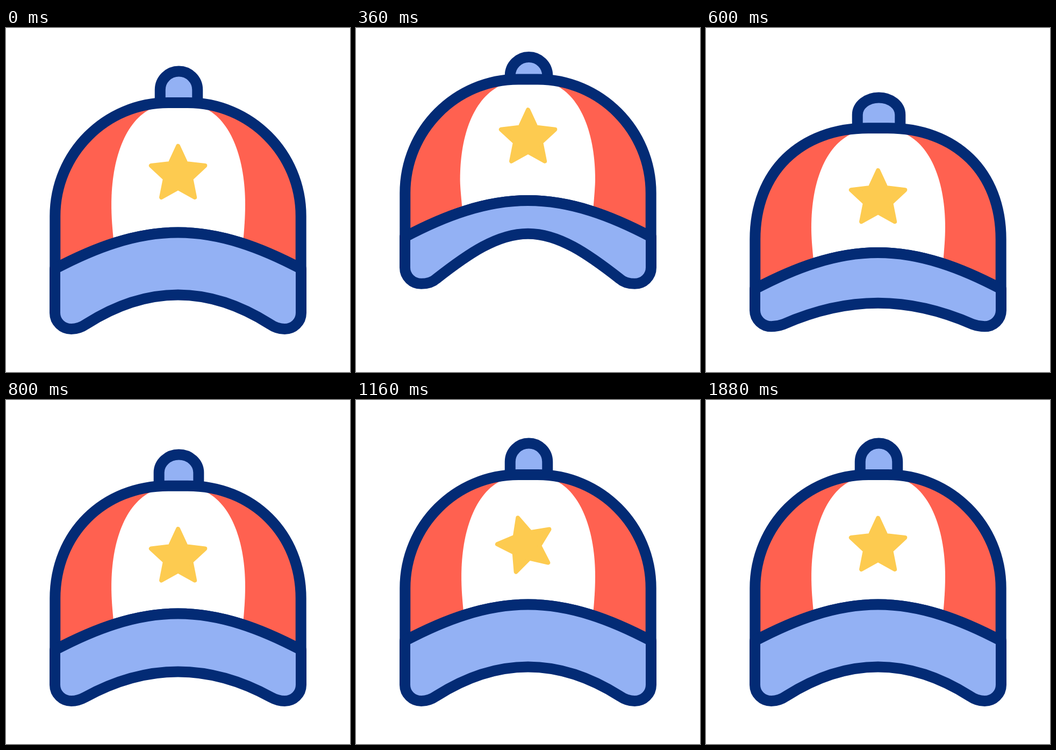
Recreate the animation shown at these times as an HTML page with a canvas. Size 640 px wide and 640 px high, loop 2000 ms.

```html
<!DOCTYPE html>
<html lang="en">
<head>
<meta charset="utf-8">
<title>Bouncing cap</title>
<style>
html, body { margin: 0; width: 100%; height: 100%; overflow: hidden; background: #fff; }
canvas { display: block; width: 640px; height: 640px; }
</style>
</head>
<body>
<canvas id="stage" width="640" height="640"></canvas>
<script>
const ctx = document.getElementById('stage').getContext('2d');
const LOOP = 2000, STEP = 40;
const NAVY = '#032b75', RED = '#ff6150', BLUE = '#93b1f4', GOLD = '#fdcb50';
const LIFT = 1.65, SQUASH = 2.54, SPIN = 107.8;

const ease = p => p * p * (3 - 2 * p);

// Eased 0 -> 1 -> 0
function swing(t, start, peak, end) {
  if (t <= start || t >= end) return 0;
  return ease(t < peak ? (t - start) / (peak - start) : (end - t) / (end - peak));
}

function paint(path, fill) {
  ctx.fillStyle = fill;
  ctx.fill(path);
  ctx.strokeStyle = NAVY;
  ctx.lineWidth = 20;
  ctx.lineJoin = 'round';
  ctx.stroke(path);
}

function draw(t) {
  const lift = LIFT * swing(t, 80, 360, 640);
  const squash = SQUASH * swing(t, 360, 640, 920);
  const angle = SPIN * swing(t, 907, 1400, 1880) * Math.PI / 180;
  const at = (base, up, down) => base - up * lift + down * squash;

  ctx.fillStyle = '#fff';
  ctx.fillRect(0, 0, 640, 640);

  const top = at(139, 26.4, 20.7);
  drawButton(at, top);
  drawCrown(at, top);
  drawBrim(at);
  drawStar(320.1, at(267.1, 40.8, 20.4), angle);
}

function drawButton(at, base) {
  const cx = 321.5, rx = at(34.75, 0, 2.1);
  const y0 = at(80.5, 16, 21), y1 = at(115, 16, 20);
  const p = new Path2D();
  p.moveTo(cx - rx, base);
  p.lineTo(cx - rx, Math.min(y1, base));
  p.ellipse(cx, y1, rx, y1 - y0, 0, Math.PI, 2 * Math.PI);
  p.lineTo(cx + rx, base);
  paint(p, BLUE);
}

// Arc shared by the crown's lower edge and the brim's upper edge
function rim(p, at, left, right) {
  const y = at(380.5, 36, 17);
  p.bezierCurveTo(right - 74, y + 28.5, 400, y, 320, y);
  p.bezierCurveTo(240, y, left + 74, y + 28.5, left, y + 67.5);
}

function drawCrown(at, top) {
  const l = 91.3, r = 640 - l;
  const side = at(350, 26, 19), join = at(448, 36, 17);
  // The shoulders bulge as the cap is squashed
  const hx = at(185.5, 0, -4.5), hy = at(233.5, 26, 15.5);
  const p = new Path2D();
  p.moveTo(l, join);
  p.lineTo(l, side);
  p.bezierCurveTo(l, hy, hx, top, 302, top);
  p.lineTo(338, top);
  p.bezierCurveTo(640 - hx, top, r, hy, r, side);
  p.lineTo(r, join);
  rim(p, at, l, r);

  const s = top + 10, mid = at(328, 28, 19), low = at(400, 36, 17);
  const x = at(196.1, 1.5, 0);
  const panel = new Path2D();
  panel.moveTo(x + 4.5, low);
  panel.bezierCurveTo(x + 1.5, low - 30, x, low - 48, x, mid);
  panel.bezierCurveTo(x, mid - 83, x + 25.5, s + 23, 272, s);
  panel.lineTo(320, s - 8);
  panel.lineTo(369.5, s);
  panel.bezierCurveTo(419.5, s + 23, 445, mid - 83, 445, mid);
  panel.bezierCurveTo(445, low - 48, 443.5, low - 30, 441, low);

  ctx.save();
  ctx.clip(p);
  ctx.fillStyle = RED;
  ctx.fillRect(0, 0, 640, 640);
  ctx.fillStyle = '#fff';
  ctx.fill(panel);
  ctx.restore();
  paint(p, 'transparent');
}

function drawBrim(at) {
  const l = 91, r = 549, m = x => 640 - x;
  const join = at(448, 36, 17), side = at(530, 51, 0), base = at(560, 51, 0);
  const hx = at(141, 0, -2), hy = at(556.5, 50, 0.9);
  const ax = at(149, 0, -2), ay = at(551, 51, 2);
  const bx = at(206, -2, -1.5), by = at(514.7, 57.7, 6.7);
  const mid = at(496.5, 69, 9);
  const p = new Path2D();
  p.moveTo(l, join);
  p.lineTo(l, side);
  p.bezierCurveTo(l, side + 17, 105, base, 121.5, base);
  p.bezierCurveTo(131, base, hx, hy, ax, ay);
  p.bezierCurveTo(bx, by, 263, mid, 320, mid);
  p.bezierCurveTo(377, mid, m(bx), by, m(ax), ay);
  p.bezierCurveTo(m(hx), hy, 509, base, 518.5, base);
  p.bezierCurveTo(535, base, r, side + 17, r, side);
  p.lineTo(r, join);
  rim(p, at, l, r);
  p.closePath();
  paint(p, BLUE);
}

function drawStar(x, y, angle) {
  ctx.save();
  ctx.translate(x, y);
  ctx.rotate(angle);
  ctx.beginPath();
  for (let i = 0; i < 10; i++) {
    const a = i * Math.PI / 5, r = i % 2 ? 25.4 : 52.8;
    ctx.lineTo(r * Math.sin(a), 5.3 - r * Math.cos(a));
  }
  ctx.closePath();
  ctx.fillStyle = ctx.strokeStyle = GOLD;
  ctx.lineWidth = 8;
  ctx.lineJoin = 'round';
  ctx.fill();
  ctx.stroke();
  ctx.restore();
}

const begin = performance.now();
function tick(now) {
  const t = Math.max(0, now - begin) % LOOP;
  draw(Math.floor(t / STEP) * STEP);
  requestAnimationFrame(tick);
}
draw(0);
requestAnimationFrame(tick);
</script>
</body>
</html>
```
